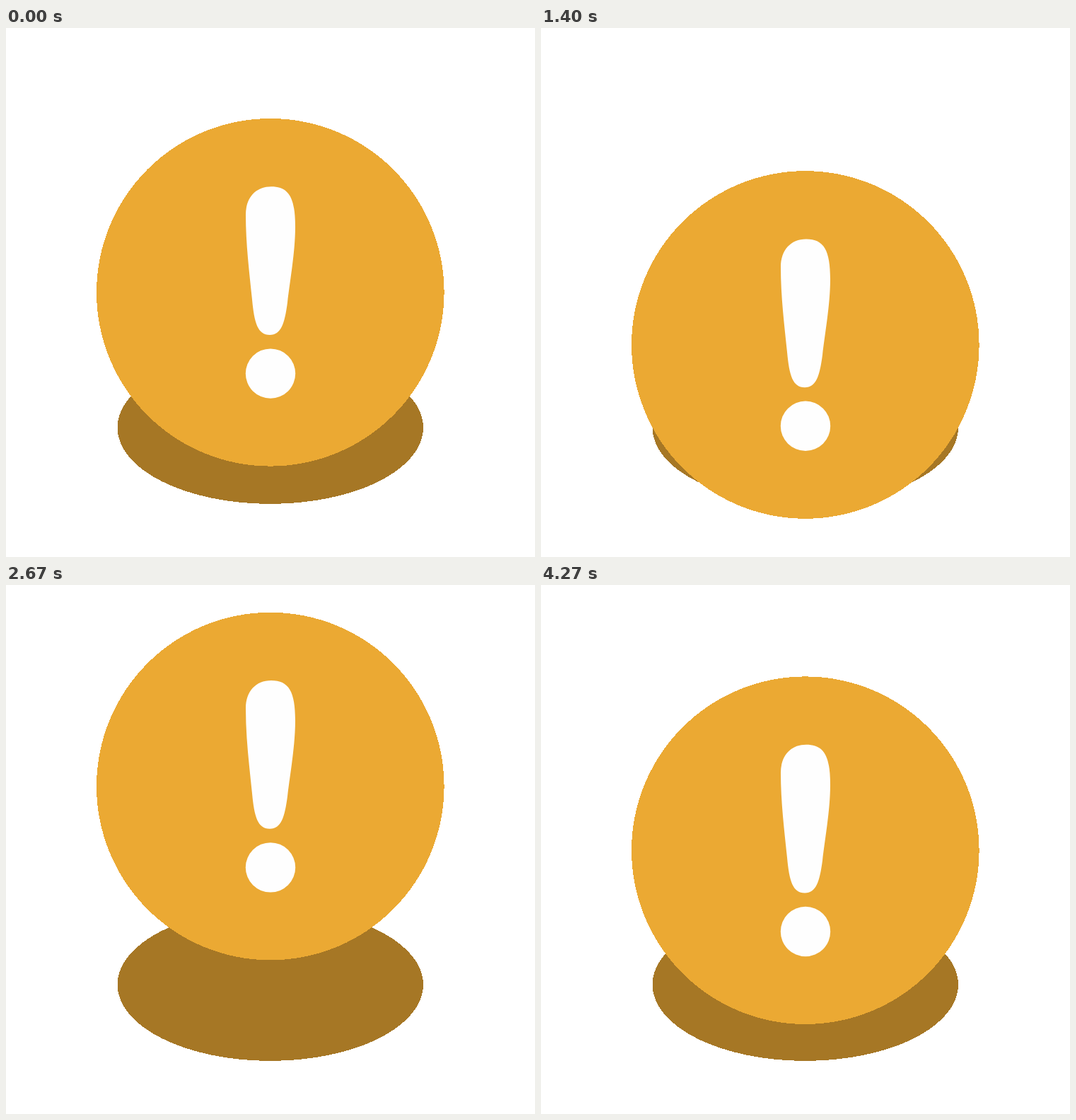
Animation of 748x748 px, one loop 5.01 s. Source, as an HTML page:

```html
<!DOCTYPE html>
<html lang="en">
<head>
<meta charset="utf-8">
<title>Bouncing alert</title>
<style>
  html, body { margin: 0; width: 100%; height: 100%; overflow: hidden; background: #fff; }
  svg { display: block; width: 100%; height: 100%; }
  .crisp { shape-rendering: crispEdges; }
</style>
</head>
<body>
<svg viewBox="0 0 748 748">
  <ellipse class="crisp" cx="373.8" cy="565" rx="216.2" ry="107.9" fill="#a67725"/>
  <g id="badge">
    <circle class="crisp" cx="373.8" cy="373.8" r="245.8" fill="#eba933"/>
    <g fill="#fefefe">
      <path d="M375 224.3 C400 224.3 409 240 409 281 C409 318 401 360 398 388 C394 418 389 434 373 434 C356 434 351 417 348 384 C344 345 339 305 339 264 C339 240 353 224.3 375 224.3Z"/>
      <circle cx="374" cy="488.6" r="35.2"/>
    </g>
  </g>
</svg>
<script>
  const LOOP = 5010, END = 4270, REST = 128;

  // Turning points of the bounce; the last swing is cut short at END
  const keys = [
    { at: 0, top: REST },
    { at: 1067, top: 12.5 },
    { at: 2110, top: 250 },
    { at: 3450, top: 7.4 },
    { at: 4537, top: 131.5 }
  ];

  const cubic = (a, b, s) => 3 * a * s * (1 - s) ** 2 + 3 * b * s * s * (1 - s) + s ** 3;

  // cubic-bezier(0.1, 0.42, 0.1, 1): quick start, long settling
  function ease(u) {
    let lo = 0, hi = 1;
    for (let i = 0; i < 30; i++) {
      const mid = (lo + hi) / 2;
      if (cubic(0.1, 0.1, mid) < u) lo = mid; else hi = mid;
    }
    return cubic(0.42, 1, lo);
  }

  function topAt(t) {
    const next = keys.findIndex(key => key.at > t);
    const a = keys[next - 1], b = keys[next];
    return a.top + (b.top - a.top) * ease((t - a.at) / (b.at - a.at));
  }

  // 30 steps per second, each rounded to 10 ms
  function snap(t) {
    const step = Math.floor((Math.floor(t / 10) * 3 + 1) / 10);
    return Math.min(END, 10 * Math.round(step * 10 / 3));
  }

  const badge = document.getElementById("badge");
  const began = performance.now();

  function draw() {
    const t = (performance.now() - began) % LOOP;
    const dy = topAt(snap(t)) - REST;
    badge.setAttribute("transform", `translate(0 ${dy.toFixed(2)})`);
    requestAnimationFrame(draw);
  }
  draw();
</script>
</body>
</html>
```
